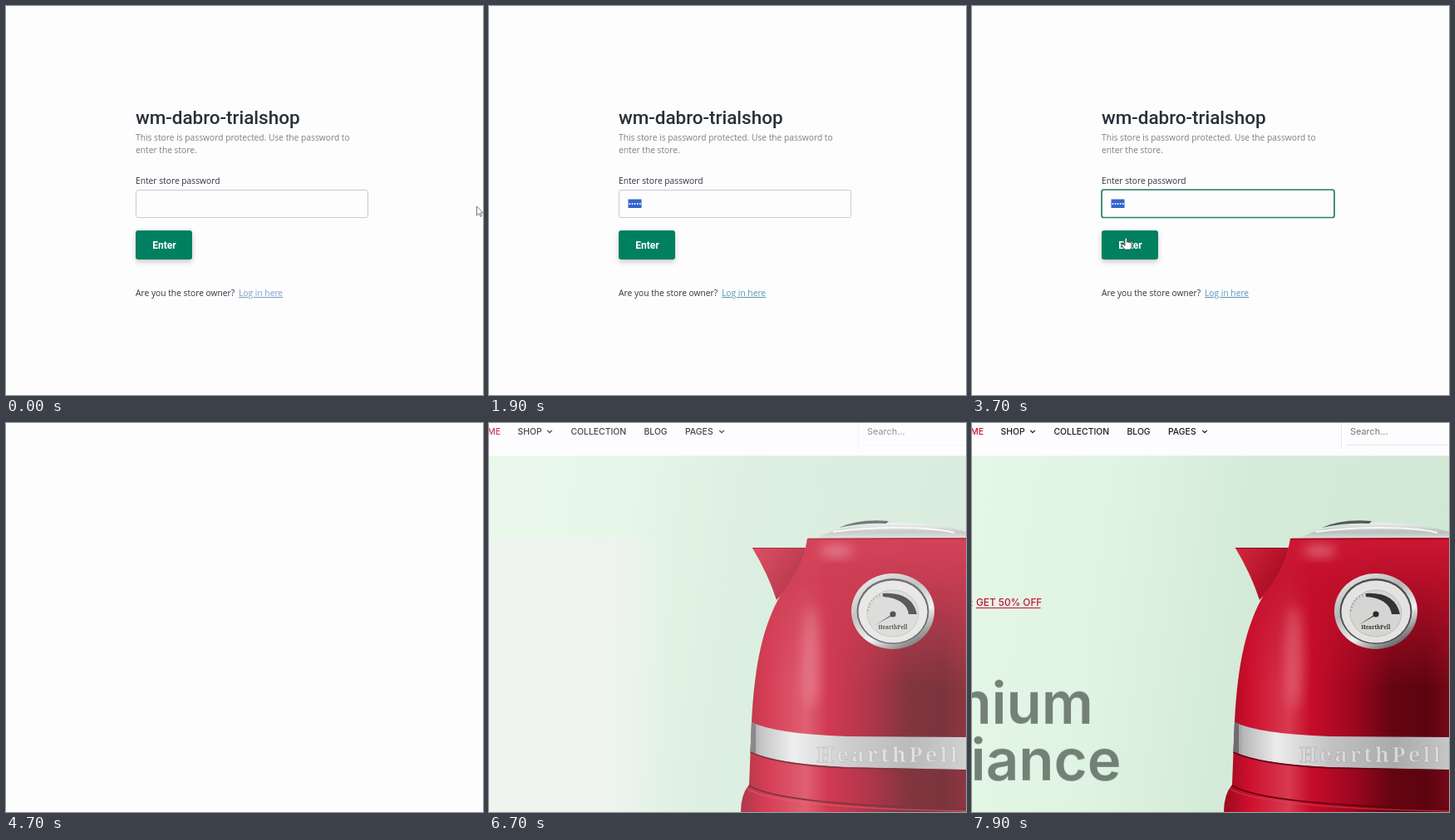
Animation of 574 by 468 pixels, one loop 8000 ms. Source, as an HTML page:

```html
<!DOCTYPE html>
<html lang="en">
<head>
<meta charset="utf-8">
<title>Store login</title>
<style>
html, body { margin: 0; width: 100%; height: 100%; overflow: hidden; background: #fdfdfd; }
svg { display: block; width: 574px; height: 468px; }

.copy { font: 10.25px "Open Sans", "Noto Sans", sans-serif; fill: #2f3640; }
.title { font: 500 22.5px Roboto, sans-serif; fill: #283039; }
.muted { fill: #7b8188; }
.enter { font: 700 12px Roboto, sans-serif; fill: #fff; }
.nav { font: 500 10.4px Inter, sans-serif; fill: #1c1c20; }
.search { font: 400 10.9px Inter, sans-serif; fill: #77777b; }
.offer { font: 500 11.8px Inter, sans-serif; fill: #c3142f; }
.headline { font: 600 69px Inter, sans-serif; fill: #222a24; text-anchor: end; }
.brand { font-family: "Noto Serif", serif; font-weight: 700; }
.button { fill: #008060; filter: drop-shadow(0 3px 3px rgba(0, 0, 0, .2)); }

/* Every track shares one 8 s clock: 1.25% is 100 ms */
.login, .away, .link, .caret, .secret, .ring, .pointer, .arrow, .hand,
.page, .loading, .box, .rise, .headline { animation: 8s linear infinite; }
.login { animation-name: login; animation-timing-function: step-end; }
.away { animation-name: away; animation-timing-function: step-end; }
.link { animation-name: link; }
.caret { animation-name: caret; animation-timing-function: step-end; }
.secret { animation-name: secret; animation-timing-function: step-end; }
.ring { animation-name: ring; }
.pointer { animation-name: pointer; }
.arrow { animation-name: arrow; animation-timing-function: step-end; }
.hand { animation-name: hand; animation-timing-function: step-end; }
.page { animation-name: page; }
.loading { animation-name: loading; }
.box { animation-name: box; }
.rise { animation-name: rise; }
.headline { animation-name: headline; }

@keyframes login { 0% { opacity: 1 } 57.5% { opacity: .4 } 58.75%, 100% { opacity: 0 } }
@keyframes away { 0% { opacity: 1 } 1.25%, 100% { opacity: 0 } }
@keyframes link { 0%, 1.25% { fill: #7f9bcc } 7.5%, 100% { fill: #5b96ba } }
@keyframes caret { 0% { opacity: 0 } 20% { opacity: 1 } 23.75%, 100% { opacity: 0 } }
@keyframes secret { 0% { opacity: 0 } 23.75%, 100% { opacity: 1 } }
@keyframes ring { 0%, 33.7% { opacity: 0 } 37.5%, 100% { opacity: 1 } }
@keyframes pointer {
  0%, 33.75% { transform: translate(262px, 330px); animation-timing-function: ease-out }
  40%, 100% { transform: translate(184px, 279px) }
}
@keyframes arrow { 0% { opacity: 0 } 33.75% { opacity: 1 } 36.25%, 100% { opacity: 0 } }
@keyframes hand { 0% { opacity: 0 } 36.25%, 100% { opacity: 1 } }
@keyframes page {
  0% { opacity: 0; animation-timing-function: step-end }
  81.25% { opacity: .68 }
  87.5%, 100% { opacity: 1 }
}
@keyframes loading { 0%, 81.25% { opacity: 1 } 88.75%, 100% { opacity: 0 } }
@keyframes box { 0%, 81.25% { opacity: 0 } 87.5%, 100% { opacity: 1 } }
@keyframes rise {
  0%, 86.25% { opacity: 0; transform: translateY(15px) }
  90% { opacity: .51; transform: translateY(7.3px) }
  92.5% { opacity: .8; transform: translateY(3px) }
  95% { opacity: .94; transform: translateY(.9px) }
  98.75%, 100% { opacity: 1; transform: none }
}
@keyframes headline {
  0%, 94.6% { opacity: 0; transform: translateY(137px) }
  96% { opacity: .11; transform: translateY(122px) }
  97.5% { opacity: .36; transform: translateY(88px) }
  98.75% { opacity: .57; transform: translateY(58px) }
  100% { opacity: .73; transform: translateY(37px) }
}
</style>
</head>
<body>
<svg viewBox="0 0 574 468">
  <defs>
    <linearGradient id="mint" x2="1" y2=".1">
      <stop offset="0" stop-color="#e5f7e7"/>
      <stop offset=".3" stop-color="#e0f4e3"/>
      <stop offset=".58" stop-color="#d5ebd9"/>
      <stop offset="1" stop-color="#d2e8d6"/>
    </linearGradient>
    <linearGradient id="red" gradientUnits="userSpaceOnUse" x1="306" x2="574">
      <stop offset="0" stop-color="#a20a20"/>
      <stop offset=".1" stop-color="#cc0f2d"/>
      <stop offset=".28" stop-color="#d83a51"/>
      <stop offset=".38" stop-color="#c60c2a"/>
      <stop offset=".56" stop-color="#a00720"/>
      <stop offset=".74" stop-color="#650511"/>
      <stop offset=".9" stop-color="#5c0410"/>
      <stop offset="1" stop-color="#740815"/>
    </linearGradient>
    <linearGradient id="top" x2="0" y2="1">
      <stop offset="0" stop-color="#cc1733"/>
      <stop offset=".16" stop-color="#c4102c" stop-opacity=".85"/>
      <stop offset=".55" stop-color="#c4102c" stop-opacity="0"/>
    </linearGradient>
    <linearGradient id="spout" x2="1" y2=".6">
      <stop offset="0" stop-color="#d52640"/>
      <stop offset="1" stop-color="#a3081f"/>
    </linearGradient>
    <linearGradient id="steel" x2="1">
      <stop offset="0" stop-color="#8b8b8d"/>
      <stop offset=".05" stop-color="#b9b9bb"/>
      <stop offset=".2" stop-color="#ececec"/>
      <stop offset=".45" stop-color="#c2c2c3"/>
      <stop offset=".75" stop-color="#aaaaac"/>
      <stop offset="1" stop-color="#c6c6c7"/>
    </linearGradient>
    <linearGradient id="chrome" x2=".6" y2="1">
      <stop offset="0" stop-color="#f2f2f2"/>
      <stop offset=".45" stop-color="#b5b5b7"/>
      <stop offset=".75" stop-color="#f0f0f0"/>
      <stop offset="1" stop-color="#6f6f72"/>
    </linearGradient>
    <linearGradient id="lid" x2="0" y2="1">
      <stop offset="0" stop-color="#eef2ef"/>
      <stop offset=".55" stop-color="#b9bfbc"/>
      <stop offset="1" stop-color="#dfe2e0"/>
    </linearGradient>
    <linearGradient id="grey" x2="1">
      <stop offset=".7" stop-color="#f1f0f2"/>
      <stop offset="1" stop-color="#f1f0f2" stop-opacity="0"/>
    </linearGradient>
    <filter id="soft" x="-50%" y="-50%" width="200%" height="200%"><feGaussianBlur stdDeviation="7"/></filter>
    <path id="body" d="M383 139C379 166 370 182 351 207C331 242 320 285 316 360L313 435Q303 447 303 468H574V138Z"/>
    <path id="cursor" d="M0 0V11L2.6 8.6L4.4 12.4L6 11.6L4.3 8H7.8Z" fill="#fff" stroke="#666a70" stroke-width=".9"/>
    <path id="chevron" d="M-2.8-1.4L0 1.4L2.8-1.4" fill="none" stroke="#1c1c20" stroke-width="1.3"/>
  </defs>

  <rect width="574" height="468" fill="#fdfdfd"/>

  <g class="login copy">
    <text class="title" x="156" y="142">wm-dabro-trialshop</text>
    <text class="muted" x="156" y="162">This store is password protected. Use the password to</text>
    <text class="muted" x="156" y="177">enter the store.</text>
    <text x="156" y="214">Enter store password</text>
    <rect x="156.5" y="221.5" width="279" height="33" rx="2" fill="#fdfdfe" stroke="#c6c9d4"/>
    <rect class="ring" x="156" y="221" width="280" height="33.5" rx="2.5" fill="none" stroke="#2b8064" stroke-width="1.7"/>
    <rect class="caret" x="167.5" y="232" width="1" height="11" fill="#333"/>
    <g class="secret">
      <rect x="167.5" y="232.5" width="16" height="10.5" fill="#3365cc"/>
      <path d="M169.4 238h13" stroke="#fff" stroke-width="2" stroke-linecap="round" stroke-dasharray="0 3.1"/>
    </g>
    <rect class="button" x="156" y="270" width="68" height="35" rx="3"/>
    <text class="enter" x="176.3" y="292">Enter</text>
    <text x="156" y="349">Are you the store owner?</text>
    <text class="link" x="280" y="349" text-decoration="underline">Log in here</text>
    <g class="away"><use href="#cursor" x="566.5" y="241"/></g>
    <g class="pointer">
      <use class="arrow" href="#cursor"/>
      <path class="hand" d="M0 .8Q1.2-.8 2.4.8V5.2Q3.8 4.2 4.6 5.6Q6 4.8 6.6 6.2Q8-.2 8 8V10Q8 12 6.6 14H-.2Q-1.4 12-3.6 9.6Q-4.8 7.8-3 7.4Q-1.4 7.8 0 9.4Z" fill="#fff" stroke="#3b4a45" stroke-width=".8"/>
    </g>
  </g>

  <g class="page">
    <rect width="574" height="40" fill="#fdfcfe"/>
    <rect y="39.5" width="574" height="429" fill="url(#mint)"/>
    <rect class="loading" x="-20" y="138" width="235" height="350" fill="url(#grey)"/>

    <g class="nav">
      <text x="14" y="13.7" text-anchor="end" fill="#c3142f" style="fill:#c3142f">HOME</text>
      <text x="34.5" y="13.7">SHOP</text>
      <use href="#chevron" x="73" y="10.3"/>
      <text x="98.5" y="13.7">COLLECTION</text>
      <text x="186.5" y="13.7">BLOG</text>
      <text x="236" y="13.7">PAGES</text>
      <use href="#chevron" x="280" y="10.3"/>
    </g>
    <path class="box" d="M444.5 0V32M450 26.5H574" stroke="#e8e7ea" fill="none"/>
    <text class="search" x="455" y="13.7">Search...</text>

    <!-- Kettle -->
    <path d="M317 150.5L382 151L384 170L346 213Q336 182 317 150.5Z" fill="url(#spout)"/>
    <path d="M317 150.5H381" stroke="#8c0a1c" stroke-width="1.2"/>
    <path d="M395 138Q428 121 490 120Q545 121 574 131V140H395Z" fill="url(#lid)"/>
    <path d="M414 131Q450 126 490 126Q535 126 560 132" fill="none" stroke="#f6f8f7" stroke-width="2"/>
    <path d="M421 126Q445 115 481 118L478 121Q447 120 421 126Z" fill="#54585a"/>
    <use href="#body" fill="url(#red)"/>
    <use href="#body" fill="url(#top)"/>
    <ellipse cx="418" cy="154" rx="20" ry="7" fill="#f0a3ae" opacity=".55" filter="url(#soft)"/>
    <ellipse cx="388" cy="282" rx="10" ry="62" fill="#ee8f9c" opacity=".4" filter="url(#soft)"/>
    <path d="M384 139.5H574" stroke="#9d0a20" stroke-width="1.5"/>

    <ellipse cx="486" cy="226.5" rx="50" ry="45.5" fill="url(#chrome)"/>
    <ellipse cx="486" cy="226.5" rx="43.5" ry="39.5" fill="#4d4d50"/>
    <ellipse cx="486" cy="227" rx="41.5" ry="37.5" fill="#e3e3e1"/>
    <ellipse cx="486" cy="229" rx="31" ry="28" fill="#d5d5d3" stroke="#bcbcba"/>
    <path d="M456 226Q459 208 476 206" fill="none" stroke="#909092" stroke-width="2.5" stroke-dasharray="1 3"/>
    <path d="M474 205Q509 203 515 230H505Q502 211 474 209Z" fill="#333337"/>
    <path d="M488 228.5L465 243L484.5 232Z" fill="#222"/>
    <circle cx="486" cy="230" r="3.6" fill="#29292c"/>
    <text class="brand" x="486" y="248" font-size="6.4" text-anchor="middle" fill="#333">HearthPell</text>

    <path d="M316 360Q345 374 430 377L574 378V417L430 414Q345 410 314.5 395Z" fill="url(#steel)"/>
    <path d="M316 360L321 362.5V397.5L314.5 395Z" fill="#6d6d70"/>
    <path d="M314.5 396Q345 411 430 415L574 418" fill="none" stroke="#5d0812" stroke-width="1.5"/>
    <text class="brand" x="394" y="408" font-size="26" letter-spacing="3" fill="#d9d9da" stroke="#9c9c9e" stroke-width=".5">HearthPell</text>
    <path d="M313 436Q350 460 574 464" fill="none" stroke="#65040f" stroke-width="2"/>
    <path d="M310 440Q348 463 574 467" fill="none" stroke="#dd4357" stroke-width="1.4" opacity=".6"/>

    <g class="rise offer">
      <text x="1.5" y="220" text-anchor="end" style="fill:#454b46">Discount:</text>
      <text x="5" y="220">GET 50% OFF</text>
      <path d="M5 222.5H82.5" stroke="#c3142f"/>
    </g>
    <g class="headline">
      <text x="146" y="304">Premium</text>
      <text x="179.5" y="372">Appliance</text>
    </g>
  </g>
</svg>
</body>
</html>
```
